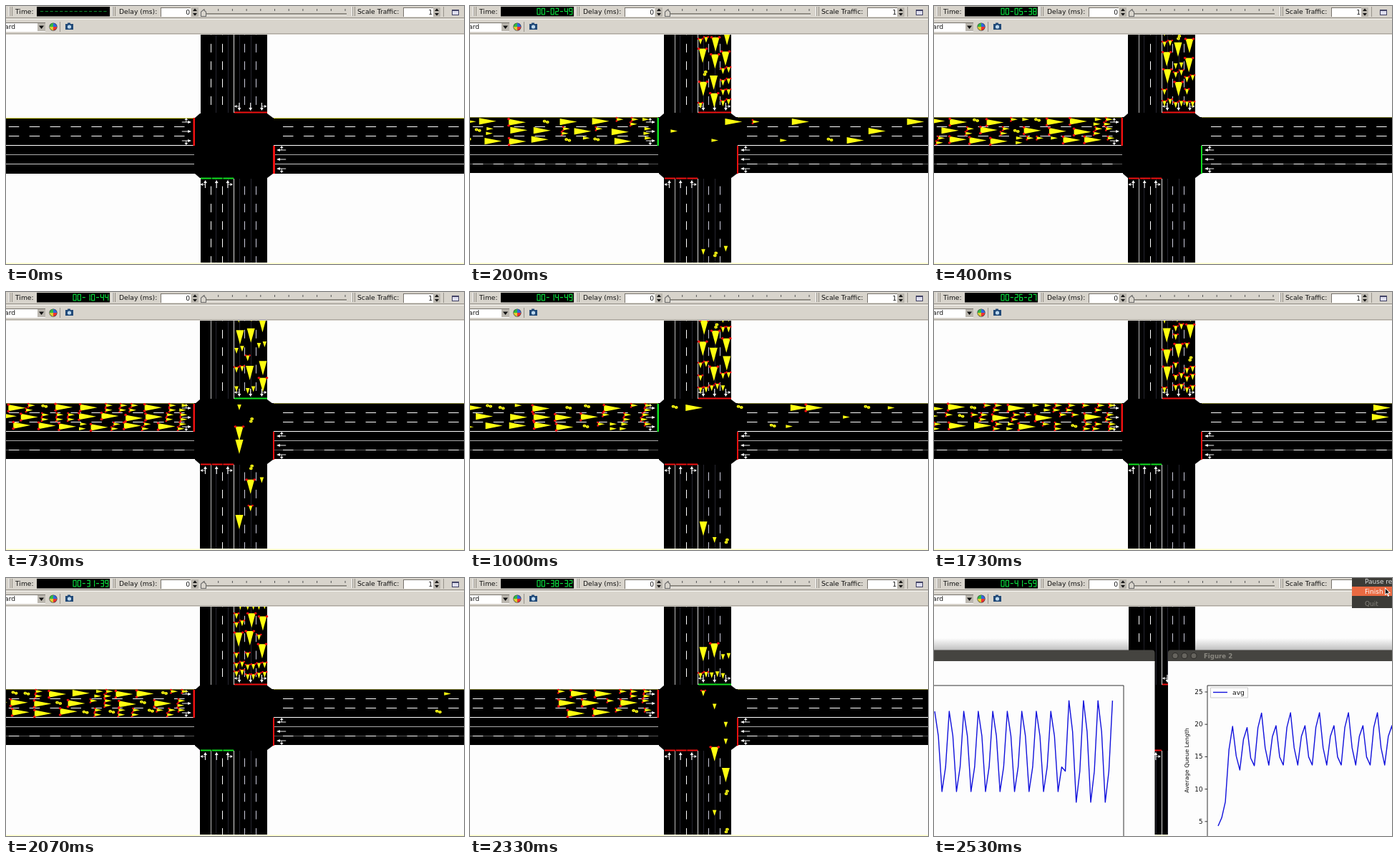
An HTML page with a canvas that plays this animation: 640x360 px, repeating every 2.59 s.

```html
<!DOCTYPE html>
<html lang="en">
<head>
<meta charset="utf-8">
<title>Traffic junction simulation</title>
<style>
html, body { margin: 0; height: 100%; overflow: hidden; background: #fdfdfd; }
canvas { display: block; }
</style>
</head>
<body>
<canvas id="stage" width="640" height="360"></canvas>
<script>
const ctx = document.getElementById('stage').getContext('2d');
const LOOP = 2590, STEP = 1000 / 15, LAST = 38, REPORT = 37;
const RED = '#f01010', GREEN = '#10e020', YELLOW = '#ffff10', BAR = '#d8d4cc';
const SANS = '"DejaVu Sans", sans-serif';
const DOWN = Math.PI / 2;

// Simulated seconds at key steps
const CLOCK = [[0, 0], [6, 338], [15, 889], [21, 1262], [26, 1587], [31, 1899], [37, 2519], [39, 2519]];
const SEGMENTS = [63, 6, 91, 79, 102, 109, 125, 7, 127, 111];

function rect(x, y, w, h, color) {
  ctx.fillStyle = color;
  ctx.fillRect(x, y, w, h);
}

function poly(points, color) {
  ctx.fillStyle = color;
  ctx.beginPath();
  points.forEach(p => ctx.lineTo(...p));
  ctx.fill();
}

function line(x1, y1, x2, y2, color, width = 1, dash = []) {
  ctx.strokeStyle = color;
  ctx.lineWidth = width;
  ctx.setLineDash(dash);
  ctx.beginPath();
  ctx.moveTo(x1, y1);
  ctx.lineTo(x2, y2);
  ctx.stroke();
  ctx.setLineDash([]);
}

function disc(x, y, r, color, from = 0, to = 7) {
  ctx.fillStyle = color;
  ctx.beginPath();
  ctx.moveTo(x, y);
  ctx.arc(x, y, r, from, to);
  ctx.fill();
}

function text(s, x, y, size = 9.2, color = '#111', align = 'left', weight = '') {
  ctx.font = `${weight} ${size}px ${SANS}`;
  ctx.fillStyle = color;
  ctx.textAlign = align;
  ctx.fillText(s, x, y);
}

function random(seed) {
  let s = seed * 7919 + 17;
  return () => {
    s = s + 0x6D2B79F5 | 0;
    let t = Math.imul(s ^ s >>> 15, 1 | s);
    t ^= t + Math.imul(t ^ t >>> 7, 61 | t);
    return ((t ^ t >>> 14) >>> 0) / 4294967296;
  };
}

function place(x, y, angle, draw) {
  ctx.save();
  ctx.translate(x, y);
  ctx.scale(1.2, 1);
  ctx.rotate(angle);
  draw();
  ctx.restore();
}

// kind: 0 bicycle, 1 motorbike, 2 car; x, y is the front
function vehicle(x, y, angle, kind, braking) {
  place(x, y, angle, () => {
    if (!kind) {
      for (const d of [-5, -1.5]) {
        disc(d, d / 3, 2, YELLOW);
        disc(d, d / 3, .6, '#762');
      }
      return;
    }
    const length = kind * 12 - 4, half = kind * 2.3;
    poly([[-length, -half], [0, 0], [-length, half]], YELLOW);
    if (braking) for (const side of [-1, 1]) disc(-length, side * half, .8 + kind * .4, RED);
  });
}

// Small vehicles gather at the front, bicycles further back
function queue(rnd, length, fill, moving, put) {
  for (let lane = 0; lane < 3; lane++) {
    let d = 3 + rnd() * 5;
    while (d < length * fill) {
      const r = rnd(), braking = rnd() > (moving ? .65 : .08);
      const kind = r < Math.min(.5, d / 80) ? 2 : r < 1 - d / (moving ? 500 : 1000) ? 1 : 0;
      if (kind === 1) {
        put(lane, d, -3.3, 1, braking);
        if (rnd() < .6) put(lane, d + rnd() * 3, 3.3, 1, braking);
      } else put(lane, d, (rnd() - .5) * 3, kind, braking);
      d += (kind === 2 ? 23 : 11) + rnd() * (moving ? 18 : 7);
    }
  }
}

function traffic(n, green) {
  const rnd = random(n);
  const pick = () => Math.floor(rnd() * 3);
  const laneX = lane => 326 + lane * 15.7, laneY = lane => 161.5 + lane * 13;
  const fill = Math.min(1, n / 3, (REPORT - n) / 4);
  if (fill <= 0) return;
  queue(rnd, 215, fill, green === 'W', (lane, d, off, kind, braking) =>
    vehicle(259 - d * 1.2, laneY(lane) + off, 0, kind, braking));
  queue(rnd, 108, fill, green === 'N', (lane, d, off, kind, braking) =>
    vehicle(laneX(lane) + off * 1.2, 146 - d, DOWN, kind, braking));

  if (green === 'W') {
    for (let x = 290; x < 640; x += 20 + rnd() * 40)
      vehicle(x, laneY(pick()), 0, pick(), rnd() < .2);
    for (let lane = 0; lane < 3; lane++)
      vehicle(laneX(lane), 338 + rnd() * 14, DOWN, pick(), false);
  } else if (green === 'N') {
    for (let y = 165; y < 358; y += 15 + rnd() * 15)
      vehicle(laneX(pick()), y, DOWN, pick(), rnd() < .2);
  } else if (green === 'S') {
    for (let left = pick(); left > 0; left--)
      vehicle(600 + rnd() * 40, laneY(pick()), 0, pick(), false);
  }
}

function arrow(x, y, angle, turn) {
  place(x, y, angle, () => {
    line(-11, 0, -2, 0, '#eee', 1);
    poly([[-4, -2], [0, 0], [-4, 2]], '#fff');
    if (turn) {
      line(-6, 0, -6, turn * 4, '#ddd', .9);
      poly([[-8, turn * 3], [-6, turn * 6], [-4, turn * 3]], '#eee');
    }
  });
}

function roads(n, green) {
  const idle = n < 1 || n >= REPORT, y0 = idle ? 156 : 155;
  rect(0, 40, 640, 320, '#fdfdfd');
  rect(0, 358.5, 640, 1.5, '#ffffc8');
  rect(idle ? 272 : 271, 40, idle ? 93 : 94, 318, '#000');
  rect(0, y0, 640, 78, '#000');
  poly([[271, 150], [365, 150], [373, 156], [373, 234], [365, 240], [271, 240], [264, 234], [264, 156]], '#000');

  // Each arm runs from the junction outwards; its first dash is one gap away
  for (const [from, first, to] of [[263, 249.5, 0], [374, 387, 640]]) {
    const dashed = y => line(first, y, to, y, '#fff', 1, [14.5, 14.4]);
    line(from, y0 + .5, to, y0 + .5, idle ? '#e8e840' : '#77772a');
    line(from, 194.5, to, 194.5, '#fff');
    line(from, 207.5, to, 207.5, '#aaa');
    line(from, 220.5, to, 220.5, idle ? '#ccc' : '#555');
    dashed(168.5);
    dashed(181.5);
    if (!idle) dashed(220.5);
  }
  for (const [from, first, to] of [[149, 138, 40], [241, 251.5, 358]]) {
    const dashed = (x, color) => line(x, first, x, to, color, 1, [12, 12.4]);
    for (const x of [293.5, 310.5, 326.5, 342.5]) line(x, from, x, to, '#262630');
    if (idle) dashed(286.5, '#fff');
    else line(286.5, from, 286.5, to, '#bbb');
    dashed(302.5, '#fff');
    dashed(333.5, '#ccd');
    dashed(349.5, '#ccd');
    line(318.5, from, 318.5, to, '#ddd');
  }

  for (let i = 0; i < 3; i++) {
    const side = i - 1;
    arrow(259, 162 + i * 13, 0, side);
    arrow(378, 201 + i * 13, Math.PI, -side);
    arrow(326 + i * 15.7, 146, DOWN, -side);
    arrow(278.5 + i * 15.7, 243, -DOWN, side);
  }
  traffic(n, green);

  const light = side => green === side ? GREEN : RED;
  rect(261.5, 156, 2.5, 39, light('W'));
  rect(373, 195, idle ? 3 : 2, 39, light('E'));
  rect(319, 147.5, 46, 2, light('N'));
  for (let i = 0; i < 3; i++) rect(272 + i * 15.7, 239.5, 14.8, 2, light('S'));
}

function digit(mask, x, y) {
  const w = 4, h = 4.3;
  const ends = [[0, 0, w, 0], [w, 0, w, h], [w, h, w, 2 * h], [0, 2 * h, w, 2 * h], [0, h, 0, 2 * h], [0, 0, 0, h], [0, h, w, h]];
  ends.forEach(([a, b, c, d], i) => {
    if (mask >> i & 1) line(x + a, y + b, x + c, y + d, '#08d83c', 1.2);
  });
}

function clock(n) {
  rect(43, 1, 102, 13.5, '#000');
  if (n < 1) {
    line(48, 7.5, 142, 7.5, '#0a8a2a', 1, [4.2, 2.6]);
    return;
  }
  const i = CLOCK.findIndex(p => p[0] > n);
  const [[a, s], [b, e]] = [CLOCK[i - 1], CLOCK[i]];
  const time = Math.round(s + (e - s) * (n - a) / (b - a));
  const shown = [time / 3600, time / 60 % 60, time % 60].map(v => String(Math.floor(v)).padStart(2, '0')).join('-');
  [...shown].forEach((c, k) => digit(c === '-' ? 64 : SEGMENTS[c], 94 + k * 6.4, 3.3));
}

function sunken(x, y, w, h) {
  rect(x, y, w, h, '#77736c');
  rect(x + 1, y + 1, w - 1, h - 1, '#fff');
}

function spinner(x) {
  rect(x, 2, 10, 13, '#bbb7af');
  poly([[x + 2, 7], [x + 5, 3.5], [x + 8, 7]], '#111');
  poly([[x + 2, 10], [x + 5, 13.5], [x + 8, 10]], '#111');
}

function grip(x, y) {
  line(x + .5, y, x + .5, y + 13, '#fff');
  line(x + 1.5, y, x + 1.5, y + 13, '#8e8a82');
  line(x + 4.5, y, x + 4.5, y + 13, '#8e8a82');
}

function toolbar(n) {
  rect(0, 0, 640, 40, BAR);
  line(0, 16.5, 640, 16.5, '#96928a');
  line(0, 18.5, 640, 18.5, '#f4f2ee');
  line(0, 38.5, 640, 38.5, '#aaa69e');
  for (const x of [4, 148, 483]) grip(x, 1);
  text('Time:', 13, 11);
  clock(n);
  text('Delay (ms):', 158, 11);
  sunken(216, 2, 42, 13);
  text('0', 257, 11.5, 9.2, '#111', 'right');
  spinner(259);
  for (let x = 277; x < 477; x += 19.7) line(x, 4, x, 7, '#555');
  rect(274, 10, 202, 2, '#8d8981');
  rect(274, 12, 202, 1, '#f6f4f0');
  poly([[272, 15], [272, 8], [276, 4.5], [280, 8], [280, 15]], '#666');
  poly([[273, 14], [273, 8.5], [276, 6], [279, 8.5], [279, 14]], BAR);
  text('Scale Traffic:', 491, 11);
  sunken(555, 2, 42, 13);
  text('1', 596, 11.5, 9.2, '#111', 'right');
  spinner(597);
  line(611.5, 1, 611.5, 15, '#96928a');
  rect(623, 5, 10, 8, '#446');
  rect(624, 7, 8, 5, '#dde');

  sunken(-2, 23, 57, 13);
  text('ard', -2, 32);
  rect(44, 24, 11, 11, '#bbb7af');
  poly([[46, 27.5], [53, 27.5], [49.5, 32]], '#111');
  disc(66, 29, 5.6, '#333');
  ['#e33', '#dc3', '#3b4', '#36d'].forEach((c, i) => disc(66, 29, 5, c, i * DOWN, (i + 1) * DOWN));
  line(75.5, 22, 75.5, 36, '#96928a');
  rect(83, 25, 11, 8, '#224a78');
  rect(86, 23.5, 4, 2, '#224a78');
  disc(88.5, 29, 2.6, '#bcd8ee');
}

function windowFrame(x, w, title) {
  const shade = ctx.createLinearGradient(0, 84, 0, 101);
  shade.addColorStop(0, 'rgba(0,0,0,0)');
  shade.addColorStop(1, 'rgba(0,0,0,.25)');
  rect(x, 84, w, 17, shade);
  ctx.fillStyle = '#454440';
  ctx.beginPath();
  ctx.roundRect(x, 100.5, w, 20, 4);
  ctx.fill();
  rect(x, 116, w, 244, '#fdfdfd');
  for (let i = 0; i < 3; i++) {
    disc(x + 10 + i * 13, 108.5, 4.5, '#2e2d2a');
    disc(x + 10 + i * 13, 108.5, 3.5, '#66645e');
  }
  text(title, x + 50, 111.5, 8.6, '#8a8880', 'left', 'bold');
}

function plot(x0, step, valueAt) {
  ctx.strokeStyle = '#1010dc';
  ctx.lineWidth = 1.4;
  ctx.lineJoin = 'round';
  ctx.beginPath();
  for (let i = 0; i < 50; i++) ctx.lineTo(x0 + i * step, valueAt(i));
  ctx.stroke();
}

// Queues rise and fall every four samples, with wider swings late on
function leftCurve(i) {
  const late = i > 35;
  return 242 - (late ? 76 : 60) * Math.cos(DOWN * (i - late) - .37);
}

// A start-up climb, then the same rhythm with alternating high and low peaks
function rightCurve(i) {
  return 229 - 35 * Math.cos(DOWN * i + .42) + 9 * Math.cos(DOWN * i / 2) + 140 * Math.exp(-i / 2);
}

function figures() {
  windowFrame(-120, 428.5, 'Figure 1');
  line(0, 150, 265, 150, '#333');
  line(265, 150, 265, 360, '#333');
  plot(1, 5.07, leftCurve);

  windowFrame(327, 330, 'Figure 2');
  line(382, 150, 640, 150, '#333');
  line(382, 150, 382, 360, '#333');
  for (let v = 5; v <= 25; v += 5) {
    const y = 159 + (25 - v) * 9.04;
    line(378.5, y, 382, y, '#333');
    text(v, 375.5, y + 3, 8.8, '#111', 'right');
  }
  ctx.save();
  ctx.translate(356, 254.5);
  ctx.rotate(-DOWN);
  text('Average Queue Length', 0, 0, 7.9, '#111', 'center');
  ctx.restore();
  plot(397, 5.06, rightCurve);
  ctx.strokeStyle = '#ccc';
  ctx.lineWidth = 1;
  ctx.strokeRect(386.5, 153, 52, 14);
  line(390, 159.5, 410, 159.5, '#1010dc', 1.4);
  text('avg', 417, 162.5);
}

function menu() {
  rect(584, 0, 56, 42, '#3c3b37');
  rect(584, 12, 56, 13, '#ea6a42');
  text('Pause re', 602, 8, 9, '#ddd');
  text('Finish', 602, 21.5, 9, '#fff');
  text('Quit', 602, 39, 9, '#85837c');
  poly([[630, 13], [630, 24], [632.5, 22], [634.5, 26], [636.3, 25], [634.5, 21.5], [638, 21]], '#fff');
  poly([[630.8, 15], [630.8, 22.3], [632.8, 20.7], [634.8, 24.6], [633.6, 20.7], [636, 20.2]], '#111');
}

function frame(now) {
  const n = Math.min(LAST, Math.floor((now % LOOP + 5) / STEP));
  const phase = (n * .42 + .19) % 1;
  const green = n >= REPORT ? 'W' : 'SWEN'[Math.floor(phase * 4)];
  roads(n, green);
  toolbar(n);
  if (n >= REPORT) figures();
  if (n === LAST) menu();
  requestAnimationFrame(() => frame(performance.now() - start));
}

const start = performance.now();
frame(0);
</script>
</body>
</html>
```
